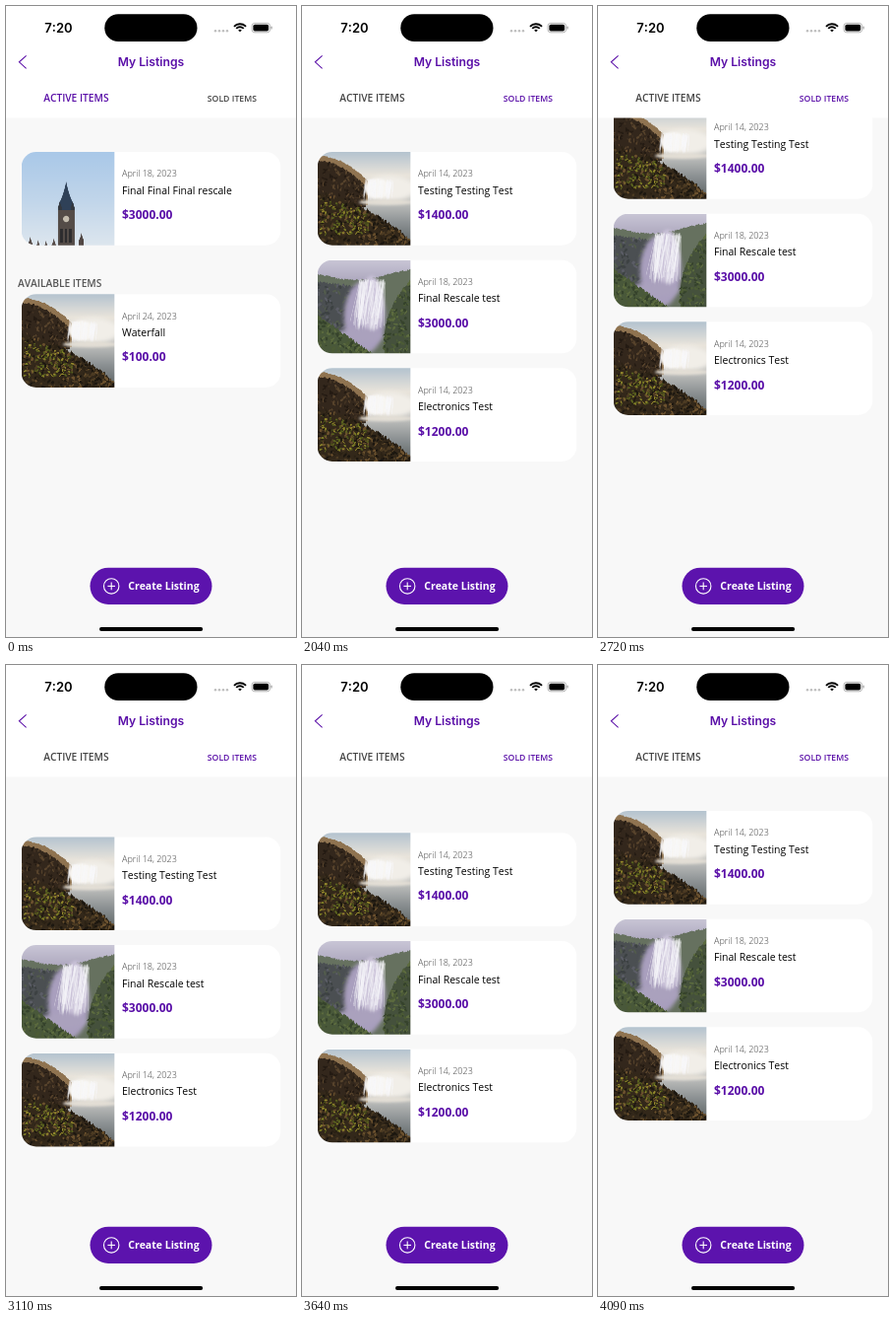
Write an HTML page with a canvas that moves like this. It is 295 by 640 pixels and loops after 4.11 s.

```html
<!DOCTYPE html>
<html lang="en">
<head>
<meta charset="utf-8">
<title>My Listings</title>
<style>
  html, body { margin: 0; width: 100%; height: 100%; overflow: hidden; background: #fff; }
  canvas { display: block; width: 295px; height: 640px; }
</style>
</head>
<body>
<canvas id="stage"></canvas>
<script>
const W = 295, H = 640, LOOP = 4110, SIDE = 95;
const PURPLE = '#5a0fa8', SANS = '"Open Sans", sans-serif', UI = 'Inter, sans-serif';
const dpr = window.devicePixelRatio || 1;
const stage = document.getElementById('stage');
stage.width = W * dpr;
stage.height = H * dpr;
const ctx = stage.getContext('2d');
ctx.fontKerning = 'none';

// The screen refreshes only at these moments.
const TICKS = [0, 860, 990, 2600, 2720, 3010, 3110, 3220, 3520, 3640, 3760, 3870, 3970, 4090];

const clamp = v => Math.max(0, Math.min(1, v));
const smooth = v => { v = clamp(v); return v * v * (3 - 2 * v); };

// ---------- motion ----------
// Drag up, drag down, then a damped spring back to rest.
function scrollAt(t) {
  if (t >= 4090) return 0;
  if (t < 2900) return -47 * clamp((t - 2480) / 240);
  if (t < 3482) return -47 + 101 * smooth((t - 2900) / 320);
  const k = 0.0125 * (t - 3482);
  return 54 * (1 + k) * Math.exp(-k);
}

// ---------- photos ----------
function seeded(s) {
  return () => (s = (s * 16807) % 2147483647) / 2147483647;
}

function photo(seed, sky, paint) {
  const c = document.createElement('canvas');
  c.width = c.height = SIDE * 2;
  const g = c.getContext('2d');
  g.scale(2, 2);
  g.fillStyle = fade(g, SIDE, sky);
  g.fillRect(0, 0, SIDE, SIDE);
  paint(g, seeded(seed));
  return c;
}

function fade(g, y, colors) {
  const f = g.createLinearGradient(0, 0, 0, y);
  colors.forEach((c, i) => f.addColorStop(i / (colors.length - 1), c));
  return f;
}

// Ground from x0 to x1 below the rough curve top(u), u in 0..1.
function land(g, rnd, color, x0, x1, top, rough = 2, bottom = SIDE) {
  g.fillStyle = color;
  g.beginPath();
  g.moveTo(x0, bottom);
  for (let x = x0; x <= x1; x++) g.lineTo(x, top((x - x0) / (x1 - x0)) + (rnd() - 0.5) * rough);
  g.lineTo(x1, bottom);
  g.fill();
}

function glow(g, color, x, y, rx, ry, blur) {
  g.filter = `blur(${blur}px)`;
  g.fillStyle = color;
  g.beginPath();
  g.ellipse(x, y, rx, ry, 0, 0, 7);
  g.fill();
  g.filter = 'none';
}

// Specks scattered below the curve top(u).
function specks(g, rnd, n, colors, x0, x1, top, size, bottom = SIDE) {
  for (let i = 0; i < n; i++) {
    const u = rnd(), y0 = top(u);
    g.fillStyle = colors[Math.floor(rnd() * colors.length)];
    g.beginPath();
    g.ellipse(x0 + u * (x1 - x0), y0 + rnd() * (bottom - y0),
      size * (0.5 + rnd()), size * (0.3 + rnd() * 0.5), rnd() * 3, 0, 7);
    g.fill();
  }
}

// Falling water: many thin translucent strands.
function strands(g, rnd, x0, x1, y0, y1, drift) {
  g.strokeStyle = 'rgba(250,248,252,.35)';
  for (let i = 0; i < 60; i++) {
    const x = x0 + rnd() * (x1 - x0);
    g.lineWidth = 0.5 + rnd() * 1.5;
    g.beginPath();
    g.moveTo(x, y0 + rnd() * 4);
    g.lineTo(x + drift * rnd(), y1 - rnd() * (y1 - y0) * 0.4);
    g.stroke();
  }
}

function spire(g, x, top, w, color) {
  g.fillStyle = color;
  g.beginPath();
  g.moveTo(x, top);
  g.quadraticCurveTo(x + w * 0.2, top + w, x + w / 2, top + w * 1.5);
  g.lineTo(x + w / 2, SIDE);
  g.lineTo(x - w / 2, SIDE);
  g.lineTo(x - w / 2, top + w * 1.5);
  g.quadraticCurveTo(x - w * 0.2, top + w, x, top);
  g.fill();
}

const tower = photo(5, ['#a9c8e8', '#c0d5ea', '#dde6ee'], (g, rnd) => {
  for (let i = 0; i < 4; i++) spire(g, 9 + i * 8, 86 + rnd() * 5, 5, '#554b47');
  spire(g, 61, 82, 5, '#514744');
  spire(g, 45.5, 30, 15, '#2f4158');
  for (const x of [39, 52]) spire(g, x, 50, 4, '#34383e');
  g.fillStyle = '#544c48';
  g.fillRect(37, 59, 17, 36);
  g.fillStyle = '#2d2c2e';
  for (let i = 0; i < 3; i++) g.fillRect(39.5 + i * 4.5, 78, 2.5, 14);
  glow(g, '#c3bcae', 45.5, 68, 3.2, 3.2, 0.3);
});

const falls = photo(71, ['#b4c3cf', '#e9e4db', '#c9c9c6', '#8d9294', '#5b6263'], (g, rnd) => {
  const cliff = u => 4 + 25 * u * u;
  const face = u => 9 + 26 * u * u;
  const shore = u => 42 + 12 * u + 36 * u * u;
  glow(g, '#f1eee8', 72, 37, 28, 13, 5);
  land(g, rnd, '#8f7350', 0, 51, cliff, 1.5, 54);
  land(g, rnd, '#33271c', 0, 49, face, 2, 56);
  specks(g, rnd, 140, ['#241b13', '#57432c', '#403122'], 0, 48, face, 1.6, 54);
  glow(g, '#f8f6f2', 61, 37, 13, 10, 2);
  strands(g, rnd, 49, 77, 27, 49, -3);
  glow(g, '#e3ded5', 70, 51, 28, 3, 2.5);
  land(g, rnd, '#33281a', 0, 95, shore, 4);
  specks(g, rnd, 320, ['#1c1710', '#4c3b23', '#2b2215', '#6b512e'], 0, 95, shore, 1.8);
  specks(g, rnd, 150, ['#7b7b26', '#59611f', '#94892d', '#444919'], 3, 52, u => 47 + 12 * u, 1.3, 84);
});

const canyon = photo(29, ['#c9c6d6', '#8e85a3', '#6d667f'], (g, rnd) => {
  const rim = u => 14 + 6 * Math.sin(u * 4);
  const right = u => 80 - 60 * Math.sqrt(u);
  const left = u => 56 + 39 * u;
  land(g, rnd, '#66715f', 0, 95, rim);
  land(g, rnd, '#4b4f52', 0, 40, u => 22 + 5 * u, 3);
  specks(g, rnd, 120, ['#3d4243', '#5b5d66', '#525b4d'], 0, 36, u => 24, 2);
  glow(g, '#a99fbe', 48, 58, 21, 37, 4);
  glow(g, '#cbc3d9', 55, 45, 12, 29, 3);
  strands(g, rnd, 42, 69, 19, 76, -10);
  glow(g, '#aaa1bd', 42, 77, 24, 8, 4);
  land(g, rnd, '#45513c', 68, 95, right, 3);
  land(g, rnd, '#49583a', 0, 56, left, 3);
  const moss = ['#36432c', '#5c6b3f', '#4c5b36'];
  specks(g, rnd, 120, moss, 68, 95, right, 1.8);
  specks(g, rnd, 120, moss, 0, 54, left, 1.8);
});

// ---------- interface ----------
function text(str, x, y, font, color, align = 'left') {
  ctx.font = font;
  ctx.fillStyle = color;
  ctx.textAlign = align;
  ctx.fillText(str, x, y);
}

function pill(x, y, w, h, r, color) {
  ctx.fillStyle = color;
  ctx.beginPath();
  ctx.roundRect(x, y, w, h, r);
  ctx.fill();
}

function line(color, width, ...pts) {
  ctx.strokeStyle = color;
  ctx.lineWidth = width;
  ctx.beginPath();
  for (let i = 0; i < pts.length; i += 2) ctx.lineTo(pts[i], pts[i + 1]);
  ctx.stroke();
}

function card(y, img, date, title, price) {
  pill(15.7, y, 263.6, 94.7, 15, '#fff');
  ctx.save();
  ctx.beginPath();
  ctx.roundRect(15.7, y, 94.6, 94.7, [15, 0, 0, 15]);
  ctx.clip();
  ctx.drawImage(img, 15.7, y, SIDE, SIDE);
  ctx.restore();
  text(date, 118, y + 25.3, `300 9px ${SANS}`, '#444');
  text(title, 118, y + 42.6, `400 10.5px ${SANS}`, '#000');
  text(price, 118, y + 68.2, `700 12px ${SANS}`, PURPLE);
}

const sold = [
  [falls, 'April 14, 2023', 'Testing Testing Test', '$1400.00'],
  [canyon, 'April 18, 2023', 'Final Rescale test', '$3000.00'],
  [falls, 'April 14, 2023', 'Electronics Test', '$1200.00']
];

function statusBar() {
  text('7:20', 53.5, 26.6, `600 13px ${UI}`, '#000', 'center');
  pill(100.3, 8.3, 94.2, 27.8, 13.9, '#000');
  for (let i = 0; i < 4; i++) pill(211.8 + i * 4, 24, 2.4, 2.4, 1.2, '#bdbdbd');
  ctx.strokeStyle = '#000';
  ctx.lineWidth = 1.9;
  for (const r of [8.2, 5.1, 1.5]) {
    ctx.beginPath();
    ctx.arc(238, 26.4, r, -Math.PI * 0.76, -Math.PI * 0.24);
    ctx.stroke();
  }
  ctx.strokeStyle = '#a3a3a3';
  ctx.lineWidth = 0.8;
  ctx.beginPath();
  ctx.roundRect(250, 17.4, 18.6, 9.4, 2.9);
  ctx.stroke();
  pill(251.4, 18.8, 15.8, 6.6, 1.7, '#000');
  pill(269.5, 20.6, 1.2, 3, 0.6, '#a3a3a3');
}

function header(isSold, t) {
  ctx.fillStyle = '#fff';
  ctx.fillRect(0, 0, W, 113.5);
  statusBar();
  line(PURPLE, 1.1, 20.6, 50.3, 13.4, 56.8, 20.6, 63.3);
  text('My Listings', 147.5, 61.4, `600 12.2px ${UI}`, PURPLE, 'center');
  text('ACTIVE ITEMS', 38.2, 97.3, `600 10.2px ${SANS}`, isSold ? '#444' : PURPLE);
  ctx.globalAlpha = isSold && t < 990 ? 0.6 : 1;
  text('SOLD ITEMS', 204.8, 96.6, `600 8.7px ${SANS}`, isSold ? PURPLE : '#444');
  ctx.globalAlpha = 1;
}

function createButton() {
  pill(85.5, 569.7, 124, 37.2, 18.6, '#5c13ad');
  ctx.strokeStyle = '#fff';
  ctx.lineWidth = 1.1;
  ctx.beginPath();
  ctx.arc(107.2, 588.4, 7.7, 0, 7);
  ctx.stroke();
  line('#fff', 1.1, 103.4, 588.4, 111, 588.4);
  line('#fff', 1.1, 107.2, 584.6, 107.2, 592.2);
  text('Create Listing', 124.2, 592.2, `700 10.5px ${SANS}`, '#fff');
}

function draw(t) {
  const isSold = t >= 860;
  ctx.setTransform(dpr, 0, 0, dpr, 0, 0);
  ctx.fillStyle = '#f8f8f8';
  ctx.fillRect(0, 0, W, H);
  if (isSold) {
    const top = 148 + scrollAt(t);
    sold.forEach((item, i) => card(top + i * 109.65, ...item));
  } else {
    card(148, tower, 'April 18, 2023', 'Final Final Final rescale', '$3000.00');
    text('AVAILABLE ITEMS', 12, 285.4, `600 10.2px ${SANS}`, '#555');
    card(292.2, falls, 'April 24, 2023', 'Waterfall', '$100.00');
  }
  header(isSold, t);
  createButton();
  pill(95, 630, 105.2, 3.9, 1.95, '#000');
}

const start = performance.now();
function loop() {
  const t = (performance.now() - start) % LOOP;
  draw(TICKS.findLast(s => s <= t) ?? 0);
  requestAnimationFrame(loop);
}
loop();
</script>
</body>
</html>
```
